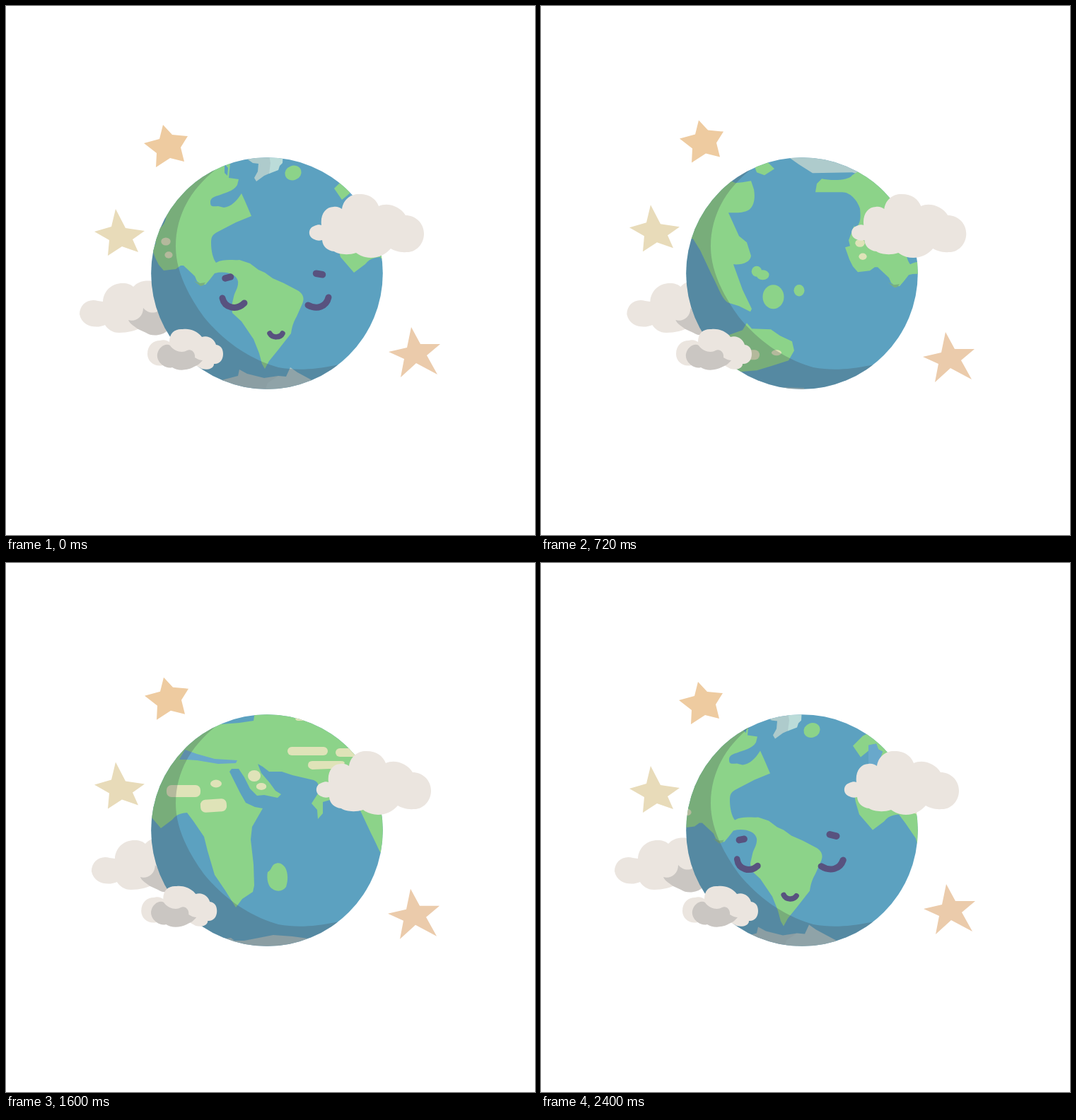
Write an HTML page that moves like this. It is 748x748 px and loops after 2.48 s.

```html
<!DOCTYPE html>
<html lang="en">
<head>
<meta charset="utf-8">
<title>Sleepy Earth</title>
<style>
  html, body { margin: 0; height: 100%; overflow: hidden; background: #fff; }
  svg { display: block; width: 100vw; height: 100vh; }
  .sea { fill: #5ca1c0; }
  .shallow { fill: #69a8cb; }
  .land { fill: #8cd389; }
  .sand { fill: #dfe3b8; }
  .ice { fill: #aecbcc; }
  .snow { fill: #bbdcd9; }
  .floe { fill: #a6bdc2; }
  .floeLight { fill: #acc5c8; }
  .cloud { fill: #ebe5df; }
  .shade { fill: #cac6c2; }
  #face { fill: none; stroke: #58527f; stroke-linecap: round; }
</style>
</head>
<body>
<svg viewBox="0 0 748 748">
  <defs>
    <clipPath id="disc"><circle cx="369" cy="378" r="163.8"/></clipPath>
    <g id="map">
      <!-- poles -->
      <path class="ice" d="M123 205V210L140 222 159 234 215 233 225 236 260 236 300 215V195H123Z"/>
      <path class="ice" d="M338 205L342 217 349 222 357 223 356 234 351 243 354 248 365 240 374 236V205Z"/>
      <path class="snow" d="M371 205L374 222 372 237 385 232 387 226 391 222 392 205Z"/>
      <path class="floe" d="M115 548L119 537 147 538 152 548ZM238 548L243 541 258 532 305 529 328 523 330 514 341 520 365 526 385 523V548Z"/>
      <path class="floeLight" d="M370 533L385 523 396 524 402 511 412 518 425 525 440 533V548H365Z"/>
      <path class="floe" d="M-245 548V533L-215 529-182 525-177 529-163 529-122 521-95 523-58 528V548Z"/>
      <path class="floeLight" d="M-68 535L-58 527-15 534 20 537 70 538V548H-68Z"/>
      <!-- the Americas -->
      <path class="land" d="M163 261L165 249 172 242C185 245 210 245 215 237L223 232C226 226 240 225 246 235L262 226 282 216 290 200H317V222L315 243 329 245 327 253C322 262 310 264 300 268 292 270 289 273 289 277 289 283 290 284 300 283L308 285C318 284 326 276 333 265L338 276 347 297 325 306 300 319C292 323 290 326 290 335 290 347 293 358 297 363 308 357 320 360 330 359L345 364 357 373 366 377 377 385 393 392 412 402C421 407 422 414 419 421L411 439C405 449 404 457 403 463L385 486 372 502 366 513 362 506 358 491 350 471 333 446 320 434 319 424 322 411C324 403 329 398 328 389 326 379 310 374 295 378L288 387 282 394 275 393 270 389 267 382 251 367H247L240 372 223 374 216 366 211 356 205 339 212 337 210 329 218 308 219 313C228 305 227 295 226 284 222 272 212 261 201 261Z"/>
      <path class="sea" d="M309 223L314 229 313 240 309 236Z"/>
      <path fill="#79b07f" d="M266 389L274 392 282 391 279 395 275 396Z"/>
      <ellipse class="sand" cx="226" cy="333" rx="6.7" ry="5.6"/>
      <ellipse class="sand" cx="230" cy="352" rx="5.6" ry="4.7"/>
      <ellipse class="land" cx="406" cy="236" rx="11.8" ry="10.2" transform="rotate(-20 406 236)"/>
      <!-- Africa and Eurasia -->
      <g transform="translate(-425 -4)">
        <path class="land" d="M116 255L127 271 138 262 140 254 149 252 152 260 158 263 154 275 146 290C139 291 133 294 130 301L117 319 120 335 125 352 144 374 160 362C168 352 176 353 181 352L190 364 205 386 210 406 220 440 235 462 250 486 259 474 274 464 276 455 275 425 271 390 273 372 288 346 277 344 264 338 256 324 241 294 244 290 254 290 262 302 270 318 280 328 290 327 309 331 314 326 306 321 298 310 286 296 281 283 288 287 297 294 315 294 330 299 360 306C369 310 367 316 366 325L357 339 365 348 366 361 373 353V337L400 329 415 331 425 347 441 381C452 402 456 416 464 421L480 426 496 434 498 430 485 403 472 367C485 368 496 364 497 355L491 336 480 327 465 294C475 294 485 295 494 290 502 284 503 272 501 261L497 249 485 251 475 252L455 243 436 230 460 214V190H280L275 222 255 225 215 228 209 220 195 222 175 223 170 227 150 231 130 241Z"/>
        <path class="shallow" d="M138 254L149 252 152 260 158 263 154 275 146 290 138 291ZM170 277L178 263 195 269 220 276 252 278 250 282 225 283 195 278 180 277Z"/>
        <path class="land" d="M304 425C312 421 316 425 320 430 324 438 324 448 321 457 316 464 308 464 302 460 296 457 293 446 295 436 300 434 300 428 304 425Z"/>
        <g class="sand">
          <rect x="152" y="313" width="48" height="17" rx="7"/>
          <rect x="200" y="333" width="37" height="18" rx="7" transform="rotate(-4 218 342)"/>
          <ellipse cx="222" cy="311" rx="8" ry="5.4"/>
          <ellipse cx="276" cy="300" rx="9" ry="8"/>
          <ellipse cx="286" cy="315" rx="7.2" ry="5"/>
          <rect x="334" y="214" width="31" height="8" rx="4"/>
          <ellipse cx="391" cy="220" rx="9" ry="3"/>
          <rect x="323" y="259" width="57" height="12" rx="6"/>
          <rect x="391" y="261" width="43" height="12" rx="6"/>
          <path d="M358 279H398Q406 279 403 284 396 291 382 290L358 291Q352 289 352 285 352 279 358 279Z"/>
        </g>
      </g>
      <!-- Pacific islands and Australia -->
      <g transform="translate(-325 -3)">
        <g class="land">
          <path d="M400 222L420 221 430 231 416 240 405 236Z"/>
          <ellipse cx="405" cy="376" rx="7.3" ry="7.5"/>
          <ellipse cx="413.5" cy="381" rx="9" ry="7"/>
          <ellipse cx="428.5" cy="412" rx="15" ry="17"/>
          <ellipse cx="465" cy="403" rx="7.5" ry="8.3"/>
          <path d="M336 509L348 487 357 469 385 459 391 449 398 457 425 458 438 467 455 475 458 488 450 502 425 510 405 516 380 518 360 523 357 512Z"/>
        </g>
        <g class="sand">
          <rect x="366" y="487" width="43" height="14" rx="7"/>
          <ellipse cx="433" cy="491" rx="7" ry="4"/>
          <ellipse cx="378" cy="506" rx="7" ry="3"/>
        </g>
      </g>
    </g>
  </defs>

  <path id="starTop" fill="#eecba0" d="M222 168L235 182 257 184 247 200 252 220 232 215 212 228 213 208 195 194 217 188Z"/>
  <path id="starLeft" fill="#e8dbb9" d="M155 287L169 314 196 318 179 330 187 348 164 340 144 353 146 331 125 319 149 312Z"/>
  <path id="starRight" fill="#ebcbab" d="M573 454L586 478 614 478 595 494 610 521 580 505 558 525 563 499 541 489 567 483Z"/>

  <g id="cloudLeft">
    <path class="cloud" d="M104 436C104 422 116 413 130 417L137 418C138 402 150 392 165 392 172 392 177 394 180 397 188 388 200 387 212 390L240 400V450L190 455C184 459 172 462 160 462 150 462 144 457 140 451 130 456 108 455 104 436Z"/>
    <path class="shade" d="M173 444C183 447 194 440 194 427 200 434 208 435 214 432L240 440 228 459C222 466 206 468 198 462L187 457C180 452 175 449 173 444Z"/>
  </g>

  <g clip-path="url(#disc)">
    <rect class="sea" x="200" y="210" width="340" height="340"/>
    <g id="scroll">
      <use href="#map" x="-773" y="-7"/>
      <use href="#map"/>
      <use href="#map" x="773" y="7"/>
    </g>
    <path fill="#444b52" fill-opacity=".28" d="M299 229C262 258 240 295 240 340 240 370 253 403 280 440 307 473 343 499 385 511 413 516 440 514 475 506L460 550H200V220Z"/>
    <g id="face"></g>
  </g>

  <path id="cloudRight" class="cloud" d="M446 310C444 295 452 284 463 284 468 283 472 285 475 287 477 272 490 265 500 266 514 266 523 273 527 283 540 277 558 284 565 296 578 296 591 306 591 322 591 338 578 349 566 348 558 349 549 346 544 343 538 350 528 356 516 356 508 356 500 353 495 349 483 353 470 351 464 347 454 346 448 340 447 331 443 332 440 332 436 330 426 326 427 314 436 311 440 309 444 309 446 310Z"/>

  <g id="cloudSmall">
    <path class="cloud" d="M200 492C200 480 208 473 218 473 224 471 229 474 231 475 231 462 239 456 250 457 259 456 270 459 277 468 286 465 295 471 297 479 304 480 307 485 307 492 307 501 301 507 294 506 294 513 285 515 277 513L268 508 225 507C212 512 200 504 200 492Z"/>
    <path class="shade" d="M214 492C216 482 226 476 232 480 238 489 250 491 256 487 262 484 268 490 267 497 272 500 275 501 278 501 272 508 270 508 266 510 256 516 242 516 235 511 226 514 212 504 214 492Z"/>
  </g>
</svg>

<script>
const FRAME_MS = 80, FRAMES = 31;
const byId = id => document.getElementById(id);

// Furthest offset of each drifting part
const drifters = {
  cloudLeft: [27, 0], cloudRight: [16, 0], cloudSmall: [-14, 0],
  starTop: [1.6, -10], starLeft: [0, -8.8], starRight: [-1.6, 10.8]
};

// Position of each facial mark at the key steps
const faceSteps = [-8, -1, 0, 5];
const faceMarks = [
  { d: 'M-4 1L3.5-1', w: 9.5, x: [109, 284, 314, 438], y: [365, 391, 384, 384] },
  { d: 'M-4.5-.8L4.5.8', w: 9.5, x: [238, 413, 443, 526], y: [356, 385, 379, 393] },
  { d: 'M-15-8C-12 6 5 10 16-1', w: 9, x: [116, 291, 321, 448], y: [410, 428, 421, 423] },
  { d: 'M-15 3C-2 10 11 5 14-8', w: 9, x: [228, 412, 442, 570], y: [402, 427, 420, 432] },
  { d: 'M-9-2C-5 5 6 4 9-2', w: 7.5, x: [177, 352, 382, 501], y: [455, 472, 465, 458] }
];

for (const mark of faceMarks) {
  mark.el = document.createElementNS('http://www.w3.org/2000/svg', 'path');
  mark.el.setAttribute('d', mark.d);
  mark.el.setAttribute('stroke-width', mark.w);
  byId('face').append(mark.el);
}

function keyed(values, step) {
  const i = step < -1 ? 0 : step < 0 ? 1 : 2;
  const u = (step - faceSteps[i]) / (faceSteps[i + 1] - faceSteps[i]);
  return values[i] + (values[i + 1] - values[i]) * u;
}

// Angle in radians at which a point sits on the globe
const longitude = x => Math.asin(Math.max(-.98, Math.min(.98, (x - 369) / 164)));

function move(el, x, y, extra = '') {
  el.setAttribute('transform', `translate(${x} ${y})${extra}`);
}

function draw(now) {
  const step = Math.floor(now / FRAME_MS) % FRAMES;
  const drift = step < 14 ? step / 14 : (30 - step) / 16;
  for (const id in drifters) move(byId(id), drifters[id][0] * drift, drifters[id][1] * drift);
  move(byId('scroll'), step * 25, step * .25);

  const faceStep = step > 15 ? step - FRAMES : step;
  for (const mark of faceMarks) {
    const x = keyed(mark.x, faceStep);
    const angle = longitude(x), rest = longitude(mark.x[2]);
    const squash = Math.sqrt(Math.cos(angle) / Math.cos(rest));
    const turn = (rest - angle) * 23;
    move(mark.el, x, keyed(mark.y, faceStep), ` scale(${squash} 1) rotate(${turn})`);
  }
  requestAnimationFrame(draw);
}

requestAnimationFrame(draw);
</script>
</body>
</html>
```
